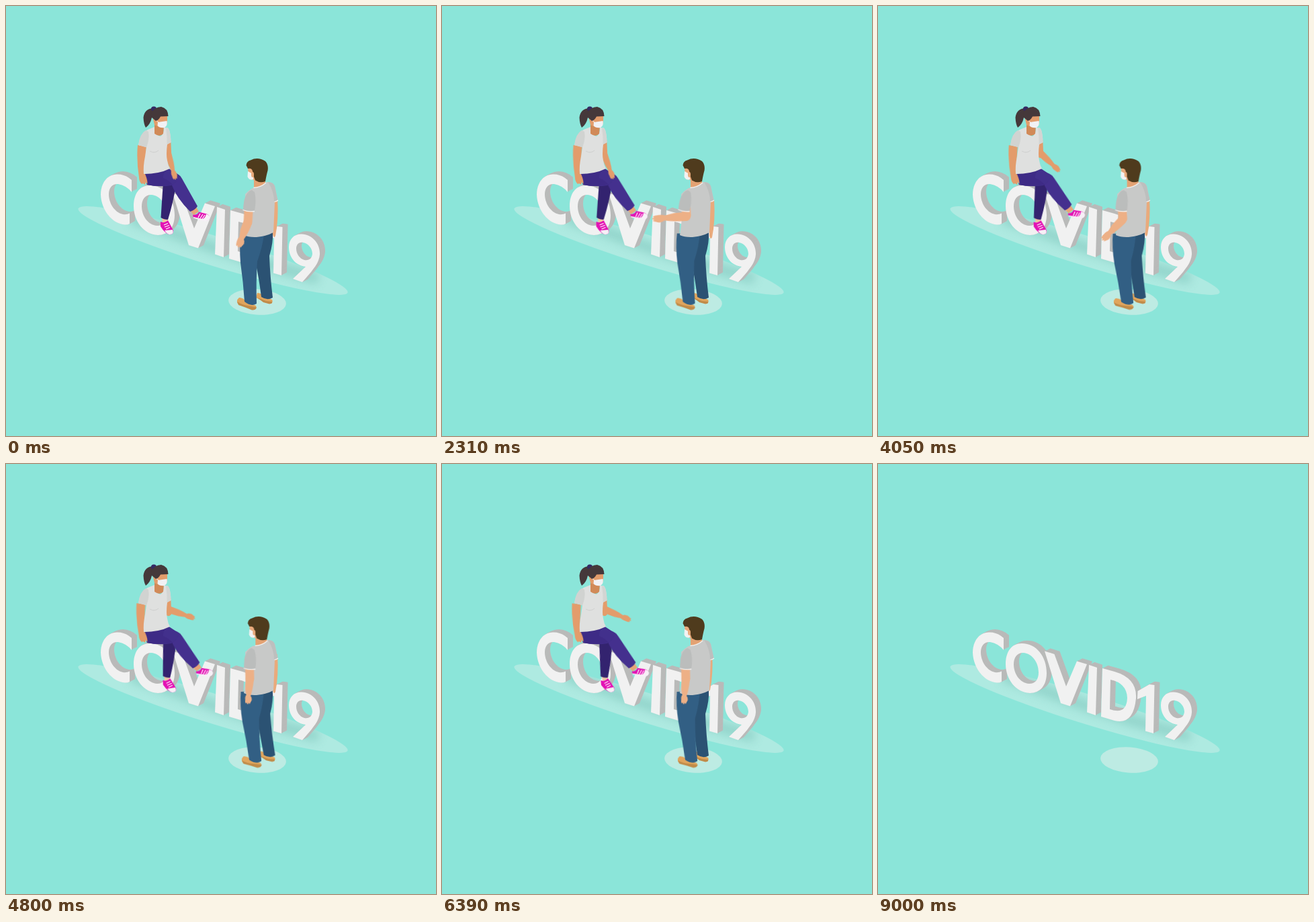
These frames come from a looping animation (640x640 px, 9030 ms). An HTML page:

```html
<!DOCTYPE html>
<html lang="en">
<head>
<meta charset="utf-8">
<title>Conversation</title>
<style>
html, body { margin: 0; width: 100%; height: 100%; overflow: hidden; background: #8be5d9; }
svg { display: block; width: 100vw; height: 100vh; }

/* Every moving part shares one clock */
.people, .move { animation: 9.03s ease-in-out infinite; }
.people { animation-name: show; animation-timing-function: step-end; }
@keyframes show { 0% { opacity: 1 } 99.66%, 100% { opacity: 0 } }

.w-leg-near { transform-origin: 244px 262px; animation-name: wLegNear; }
@keyframes wLegNear {
  0%, 37.21% { transform: rotate(0deg) }
  13.95% { transform: rotate(.8deg) }
  53.16%, 85.38% { transform: rotate(-3.3deg) }
  70.76% { transform: rotate(-6deg) }
  100% { transform: rotate(-1deg) }
}
.w-leg-far { transform-origin: 252px 254px; animation-name: wLegFar; }
@keyframes wLegFar {
  0%, 13.95% { transform: rotate(0deg) }
  37.21%, 85.38% { transform: rotate(-4.5deg) }
  100% { transform: rotate(-1deg) }
}
.w-prop { transform-origin: 205px 262px; animation-name: wProp; }
@keyframes wProp {
  0%, 13.95% { transform: rotate(0deg) }
  37.21%, 85.38% { transform: rotate(-1deg) }
  53.16% { transform: rotate(-1.8deg) }
  70.76% { transform: rotate(-2.6deg) }
  100% { transform: rotate(0deg) }
}
.w-fore { animation-name: wFore; }
@keyframes wFore {
  0%, 13.95%, 100% { transform: translate(242px, 222px) rotate(74deg) scale(.98, .95) }
  37.21% { transform: translate(242px, 222px) rotate(66deg) scale(.98, .95) }
  53.16% { transform: translate(244px, 217px) rotate(19deg) scale(1.02, 1) }
  70.76% { transform: translate(244px, 217px) rotate(23deg) scale(1.05, 1) }
  85.38% { transform: translate(242px, 222px) rotate(64deg) scale(1, .95) }
}

.m-head { animation-name: mHead; }
@keyframes mHead {
  0%, 100% { transform: translate(0, 0) }
  13.95%, 37.21%, 70.76% { transform: translate(1px, 0) }
  53.16% { transform: translate(2.3px, 0) }
  85.38% { transform: translate(.5px, 0) }
}
.m-leg-near { transform-origin: 364px 345px; animation-name: mLegNear; }
@keyframes mLegNear {
  0%, 13.95%, 85.38%, 100% { transform: rotate(0deg) }
  37.21%, 70.76% { transform: rotate(-4.2deg) }
}
.m-leg-far { transform-origin: 386px 342px; animation-name: mLegFar; }
@keyframes mLegFar {
  0%, 37.21%, 70.76%, 100% { transform: rotate(0deg) }
  53.16% { transform: rotate(-2.3deg) }
}
.m-back { animation-name: mBack; }
@keyframes mBack {
  0%, 37.21%, 100% { transform: translate(0, 0) }
  13.95% { transform: translate(2px, 4px) }
  53.16% { transform: translate(0, -3px) }
  70.76%, 85.38% { transform: translate(-2px, -6px) }
}
.m-upper { transform-origin: 362px 285px; animation-name: mUpper; }
@keyframes mUpper {
  0%, 100% { transform: rotate(3deg) scaleY(1) }
  13.95% { transform: rotate(-2deg) scaleY(.7) }
  37.21% { transform: rotate(-7deg) scaleY(.84) }
  53.16%, 70.76% { transform: rotate(-1.5deg) scaleY(1) }
  85.38% { transform: rotate(-6deg) scaleY(1.05) }
}
.m-fore { animation-name: mFore; }
@keyframes mFore {
  0%, 100% { transform: translate(360px, 322px) rotate(111deg) scale(1.03, 1.3) }
  13.95% { transform: translate(363px, 311px) rotate(183deg) scale(1.38, 1.3) }
  37.21% { transform: translate(364px, 316px) rotate(169deg) scale(1.24, 1.3) }
  53.16%, 70.76% { transform: translate(363px, 322px) rotate(95deg) scale(.92, 1.15) }
  85.38% { transform: translate(365px, 324px) rotate(86deg) scale(.94, 1.2) }
}
.m-sleeve { transform-origin: 364px 280px; animation-name: mSleeve; }
@keyframes mSleeve {
  0%, 37.21%, 100% { transform: rotate(0deg) }
  13.95% { transform: rotate(6deg) }
  53.16%, 85.38% { transform: rotate(-3deg) }
}
</style>
</head>
<body>
<svg viewBox="0 0 640 640">
  <defs>
    <filter id="soft" x="-20%" y="-20%" width="140%" height="140%"><feGaussianBlur stdDeviation="7"/></filter>
    <ellipse id="oval" cx="308" cy="364" rx="210" ry="22" transform="rotate(17.3 308 364)"/>
    <clipPath id="floor"><use href="#oval"/></clipPath>
    <path id="word" fill-rule="evenodd" d="
      M187 259Q177 250 165 250.500C150 251 141 264 141 281C142 304 158 324 177 325.500Q181 326 184 324V308.500Q180 311 174 310C161 307 153 293 153 280C153 270 159 264 167 265Q179 267 187 277Z
      M214 267C236 267 251 287 251 311C251 330 241 341 226 341C205 340 190 320 190 298C190 279 199 267 214 267Z
      M216 281C207 281 202 288 202 298C202 312 211 326 225 327C234 327 239 321 239 310C239 296 230 282 216 281Z
      M248 278.500L262.500 283 280 331 296 293.500 311 298 286 360.500 272 356Z
      M314 299L326 303 324 374 311 369.500Z
      M334 304L352 309Q386 319 384 349Q380 389 352 382L332 376Z
      M346 321L345 365Q370 374 371 348Q370 326 346 321Z
      M404 328L411.500 329 410 401 398 397.500 399 345 386 350 386.500 338Z
      M440 339.500C456 340 468 354 467 370C466 381 460 388 454 396L441 411 427 406 446 388C430 386 421 373 421 359C421 347 429 339 440 339.500Z
      M442 352C436 351 432 355 432 361C432 369 437 376 444 378C450 379 455 377 456 369C456 361 450 353 442 352Z"/>
    <path id="fore" d="M0-5Q14-5 25-2.600Q28-5 32-4.500L37.500-2.600Q39-1.500 36-1.300L39 0Q39 1.500 36 1L38 2.500Q36 4 31 4Q27 4.500 24 3Q12 6 0 5A5 5 0 0 1 0-5Z"/>
  </defs>

  <rect width="640" height="640" fill="#8be5d9"/>
  <use href="#oval" fill="#aeeae1"/>
  <g clip-path="url(#floor)">
    <path d="M175 318L240 341 300 363 370 385 455 409" transform="translate(10 -3)" fill="none" stroke="#6bb5ab" stroke-width="17" opacity=".4" filter="url(#soft)"/>
  </g>
  <ellipse cx="374" cy="440.500" rx="43" ry="19" transform="rotate(4 374 440.500)" fill="#bdebe3"/>

  <g id="depth" fill="#b9bab9"></g>
  <use href="#word" fill="#f1f1f1"/>

  <g class="people">
    <!-- seated woman -->
    <g class="move w-leg-near">
      <path d="M232 315L241 316 240.500 322 233 322Z" fill="#f0c3a5"/>
      <path d="M234 262Q232 290 230.500 315Q235 318 241 318Q249 292 253 266Z" fill="#33236f"/>
      <path d="M230 321Q236 324 241 319L249 334Q250 340 243 340Q236 338 230 328Z" fill="#e312b4"/>
      <path d="M236 334L248 333Q251 340.500 243 340Q239 339 236 334Z" fill="#f6f0f6"/>
      <path d="M235 326L241 323.500M236 329L243 326.500M238 332L244 329.500" stroke="#fff" stroke-width="1.200"/>
    </g>
    <g class="move w-leg-far">
      <path d="M274 304L283 299 287 306 279 311Z" fill="#e8a577"/>
      <path d="M242 247Q257 247 262 257L285 298Q281 304 274 306Q254 286 247 267Z" fill="#44308e"/>
      <path d="M278 311Q285 311 287 306.500L299 309.500Q304 312 303 317Q299 321 293 319L279 315Z" fill="#e312b4"/>
      <path d="M298 309.500Q305 312 303 317Q299 322 292 319.500L279 315.500V314L293 317Q297 315 298 309.500Z" fill="#f6f0f6"/>
      <path d="M286 315L289 309M289 316L293 310M292 317L296 311" stroke="#fff" stroke-width="1.200"/>
    </g>
    <path d="M205 250Q222 249 241 241Q250 247 258 252Q254 264 246 267Q228 270 210 266Z" fill="#42308c"/>
    <path d="M205 250Q222 249 240 243Q233 249 234 256Q242 259 248 266Q228 270 210 266Z" fill="#3e2b86"/>
    <path d="M241 200L242 222" stroke="#e39c6b" stroke-width="8.500" stroke-linecap="round"/>
    <use class="move w-fore" href="#fore" fill="#e39c6b"/>
    <g class="move w-prop">
      <path d="M196 207L209 209Q207 230 206 248Q211 258 210.500 265L208 262 207 266 204 264 202 265Q198 261 198 255Q194 230 196 207Z" fill="#e39c6b"/>
    </g>
    <path d="M211 184Q216 182 221 180Q222 193 230 194Q235 191 235 181L241 181.500Q245 186 245.500 203L240 206Q238 221 240 230Q241 237 244 242Q228 250 205 250Q204 238 207 224L209 210 197 207Q200 190 211 184Z" fill="#dfe0df"/>
    <path d="M208 185Q199 190 197 207L209 210.500Q214 198 212 187Z" fill="#d1d3d1"/>
    <path d="M238 182Q240 193 239.500 206L245.500 203Q245 186 241 181.500Z" fill="#d3d5d3"/>
    <path d="M214 216Q221 220 227 215" fill="none" stroke="#cfd0cf" stroke-width="1"/>
    <path d="M221 177L235 179 234 190Q229 196 221 190Z" fill="#d18a58"/>
    <path d="M218 164Q230 159 240 163L240 174Q237 181 230 181L221 177Z" fill="#e39c6b"/>
    <path d="M219 167L227 173" stroke="#f0f0f2"/>
    <path d="M226 173L239.500 171Q241 178 236 181Q229 182 225.500 178Z" fill="#f1f1f4"/>
    <path d="M219 152Q206 153 204.500 166Q205 176 208 181Q215 176 217 166L224 159Z" fill="#45383a"/>
    <ellipse cx="220" cy="153" rx="4" ry="3.500" fill="#342a63"/>
    <path d="M216 160Q221 150 231 150Q241 152 241.500 164L230 164.500Q227 170 223 171L217 166Z" fill="#45383a"/>

    <!-- standing man -->
    <g class="move m-leg-far">
      <path d="M374 427Q381 427 384 433L396 437Q398 441 394 443L385 441 372 434Z" fill="#e0a55d"/>
      <path d="M374 434L387 439 396 440Q397 443 392 443.500L383 441Z" fill="#c18b49"/>
      <path d="M372 340L397 337Q398 352 392 372Q393 402 397 434Q389 439 380 433Q376 402 372 385Z" fill="#2b5273"/>
    </g>
    <g class="move m-leg-near">
      <path d="M347 434Q353 434 358 440L372 446Q374 451 368 452L357 448 345 443Q342 438 347 434Z" fill="#e0a55d"/>
      <path d="M344 440Q352 445 360 446L373 448.500Q372 453 366 452.500L356 448.500 346 445Z" fill="#c18b49"/>
      <path d="M350 338L384 340Q382 358 374 380Q372 410 373 443Q365 448 355 440Q353 410 349 382Q347 358 350 338Z" fill="#325f84"/>
    </g>
    <path class="move m-back" d="M396 288L404 286Q406 318 401 342Q399 347 397 340Z" fill="#e9aa7c"/>
    <path d="M367 271Q378 270 388 262Q397 261 400 268L404.500 289Q403 291 400 291Q399 316 398 337Q388 342.500 373 344Q361 344.500 354 341Q357 320 358 303L356 280Q360 275 367 271Z" fill="#c8c9c8"/>
    <path d="M390 262Q398 262 400 268L404.500 289 399 291Q399 276 390 262Z" fill="#bdbfbe"/>
    <path d="M399.500 291.500Q403 291 405 289" fill="none" stroke="#f1f1f1" stroke-width="1.200"/>
    <path class="move m-upper" d="M362 290L362 320" stroke="#edb086" stroke-width="13" stroke-linecap="round"/>
    <use class="move m-fore" href="#fore" fill="#edb086"/>
    <g class="move m-sleeve">
      <path d="M366 274Q354 277 353 303Q361 307 370 305Q373 288 370 277Z" fill="#bbbdbc"/>
      <path d="M352.500 303.500Q361 307 370 305.500" fill="none" stroke="#f1f1f1" stroke-width="1.300"/>
    </g>
    <g class="move m-head">
      <path d="M369 258L386 255 386 264Q378 271 369 270Z" fill="#e3a273"/>
      <path d="M368.500 270.500Q379 270 387 263" fill="none" stroke="#f1f1f1" stroke-width="1.500"/>
      <path d="M360 241L372 240 373 258Q366 261 361 254Z" fill="#e9aa7c"/>
      <path d="M360 246Q365 248 368 252L368 258Q362 260 359.500 254Z" fill="#f2f2f3"/>
      <path d="M357.500 237Q358 231 364 229.500Q375 224 386 231Q391 236 389.500 245Q388 250 386 261Q378 264 371 259.500Q368 253 367 246Q366 241 360 242Z" fill="#4f3b1d"/>
      <ellipse cx="367" cy="251" rx="2" ry="4" fill="#e9aa7c"/>
    </g>
  </g>
</svg>
<script>
// Extrude the lettering back and to the right
const depth = document.getElementById('depth');
const steps = 12;
for (let i = steps; i > 0; i--) {
  const layer = document.createElementNS('http://www.w3.org/2000/svg', 'use');
  layer.setAttribute('href', '#word');
  layer.setAttribute('transform', `translate(${8 * i / steps} ${-4.2 * i / steps})`);
  depth.append(layer);
}
</script>
</body>
</html>
```
